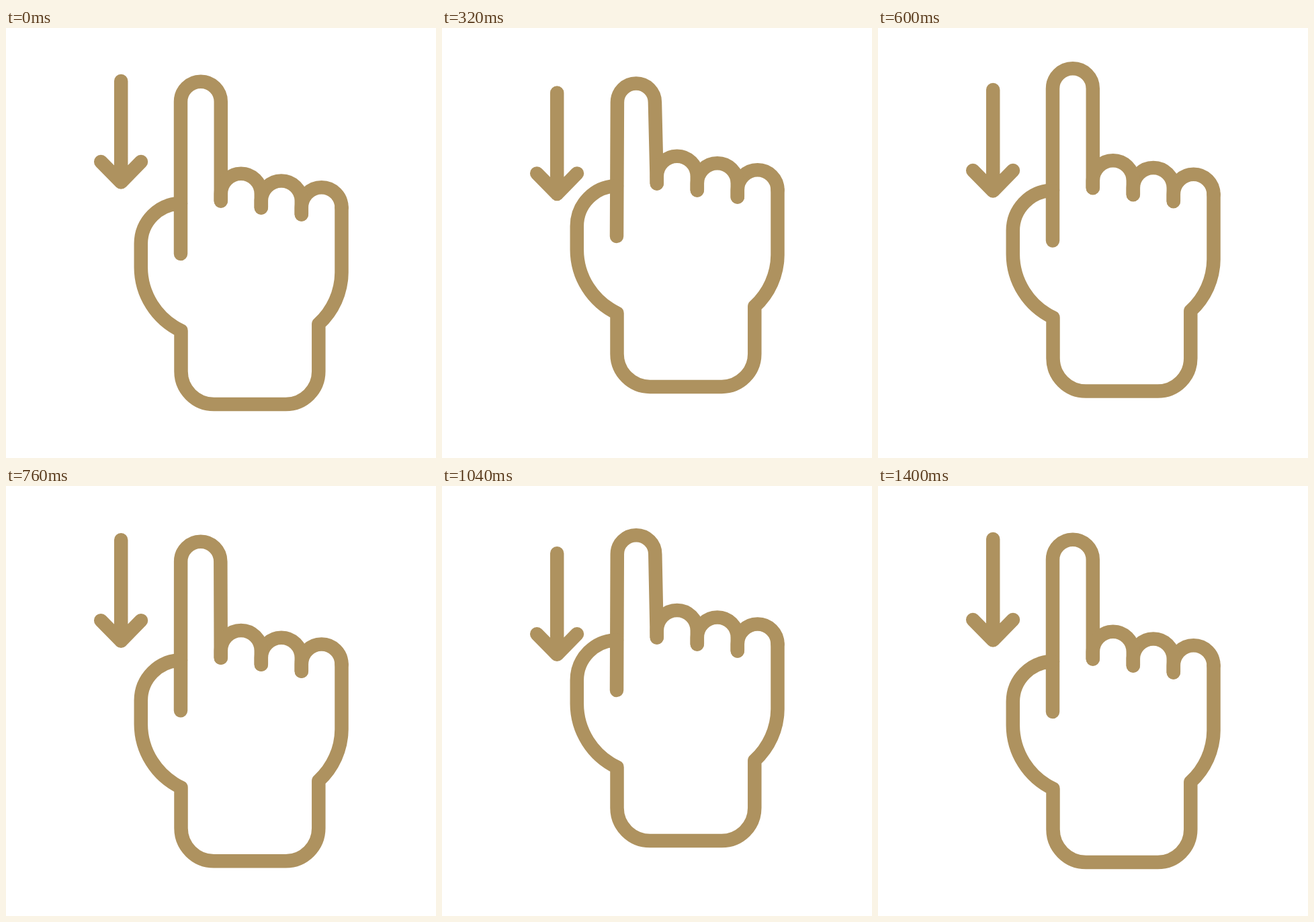
An HTML page that plays this animation: 640 by 640 pixels, repeating every 1480 ms.

```html
<!DOCTYPE html>
<html lang="en">
<head>
<meta charset="utf-8">
<title>Swipe down</title>
<style>
  html, body { margin: 0; width: 100%; height: 100%; overflow: hidden; background: #fff; }
  svg { display: block; width: 100vw; height: 100vh; }
  g { fill: none; stroke: #ae925f; stroke-width: 20.5; stroke-linecap: round; stroke-linejoin: round; }
</style>
</head>
<body>
<svg viewBox="0 0 640 640">
  <g id="arrow">
    <path d="M171.2 79V229.5M141.2 199L171.2 229.5L201 199"/>
  </g>
  <g id="hand">
    <path id="finger"/>
    <path d="M260 261.2A60 60 0 0 0 200.8 321V356A105 105 0 0 0 260.5 450.5V511
             A49 49 0 0 0 309.5 560H416.3A49 49 0 0 0 465.3 511V440.5
             A105 105 0 0 0 499.5 364V267.2"/>
    <path d="M499.5 267.2A29.8 29.8 0 0 0 439.8 267.2V277.5"/>
    <path d="M439.8 277.5V257.4A30 30 0 0 0 379.8 257.4V267.5"/>
    <path d="M379.8 267.5V246.8A30 30 0 0 0 319.8 246.8V257.5"/>
  </g>
</svg>
<script>
  const LOOP = 1480, STEP = 40, DELAY = 33, CYCLE = 667, END = DELAY + 2 * CYCLE;
  const LIFT = 39, DROP = 26;

  // Keyframes: [time, value], eased between neighbours
  const swipe = [[0, 0], [467, 1], [667, 0]];
  const bend = [[0, 0], [233, 1], [300, 1], [480, 0], [667, 0]];

  const $ = id => document.getElementById(id);
  const arrow = $('arrow'), hand = $('hand'), finger = $('finger');
  const ease = x => x * x * (3 - 2 * x);

  function sample(keys, t) {
    for (let i = 1; i < keys.length; i++) {
      const [t0, a] = keys[i - 1], [t1, b] = keys[i];
      if (t <= t1) return a + (b - a) * ease((t - t0) / (t1 - t0));
    }
    return 0;
  }

  function fingerPath(m) {
    const left = 260 + 0.9 * m, right = 319.8 - 2.9 * m;
    const r = (right - left) / 2, y = 109.7 + 27 * m;
    return `M260 336L${left} ${y}A${r} ${r} 0 0 1 ${right} ${y}L319.8 257.5`;
  }

  function draw(now) {
    const t = Math.floor((now % LOOP) / STEP) * STEP;
    const active = t > STEP && t < END;
    const phase = active ? (t - DELAY) % CYCLE : 0;
    const s = sample(swipe, phase);
    hand.setAttribute('transform', `translate(0 ${-LIFT * s})`);
    arrow.setAttribute('transform', `translate(0 ${DROP * s})`);
    finger.setAttribute('d', fingerPath(sample(bend, phase)));
  }

  const start = performance.now();
  function tick() {
    draw(performance.now() - start);
    requestAnimationFrame(tick);
  }
  tick();
</script>
</body>
</html>
```
